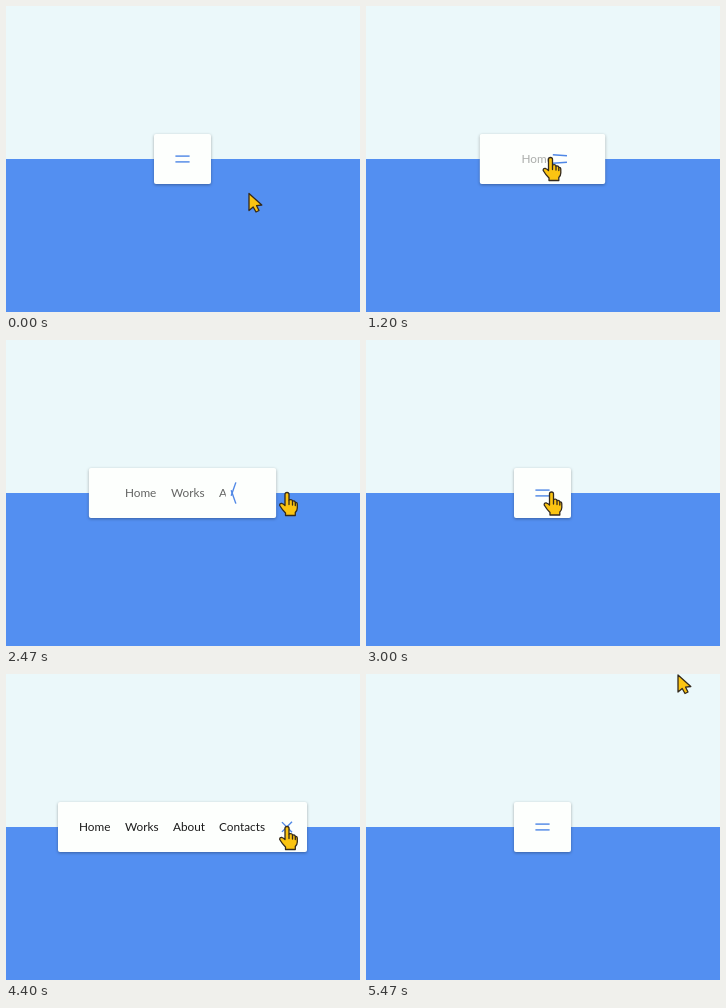
An HTML page that plays this animation: 354 by 306 pixels, repeating every 5.61 s.

```html
<!DOCTYPE html>
<html lang="en">
<head>
<meta charset="utf-8">
<title>Expanding menu</title>
<style>
  html, body { margin: 0; width: 100%; height: 100%; overflow: hidden; }
  svg { display: block; }
  #card { fill: #fdfffd; filter: drop-shadow(0 1.4px 1.7px rgba(0, 0, 0, .32)); }
  text { font: 11.8px Lato, "Open Sans", sans-serif; fill: #1c1c1c; }
  .line { fill: #4f87e6; }
  #cursor path { fill: #fbc412; stroke: #33291c; stroke-width: 1.3; stroke-linejoin: round; stroke-linecap: round; }
</style>
</head>
<body>
<svg width="354" height="306" viewBox="0 0 354 306">
  <clipPath id="clip"><rect id="window" y="128" height="50"/></clipPath>
  <rect width="354" height="153" fill="#ebf8fa"/>
  <rect y="153" width="354" height="153" fill="#538ff1"/>
  <rect id="card" y="128" height="50" rx="2"/>
  <g clip-path="url(#clip)">
    <g id="links">
      <text x="7" y="157">Home</text>
      <text x="53" y="157">Works</text>
      <text x="101" y="157">About</text>
      <text x="147" y="157">Contacts</text>
    </g>
  </g>
  <rect id="top" class="line" x="-7.1" y="-.7" width="14.2" height="1.4"/>
  <rect id="bottom" class="line" x="-7.1" y="-.7" width="14.2" height="1.4"/>
  <g id="cursor">
    <path id="arrow" d="M0 .5V17.5L4.2 14L7 19L10 17.5L7.6 12.7L12.8 12Z"/>
    <g id="hand">
      <path d="M-2 13V2Q-2 0 0 0Q2 0 2 2V7.5Q5 6.5 5.5 8.5Q8 8 8.3 10Q10.3 9.5 10.3 12V15.5Q10.3 18 8.3 20V23H-1.5V20.5Q-5 17-7.3 13Q-7.5 10.5-5 11Q-3.5 11.5-2 13Z"/>
      <path d="M2 8V12M5.5 9V12.5M8.3 10.5V13"/>
    </g>
  </g>
</svg>
<script>
const LOOP = 5610, CENTER = 176.5, PAD = 14, ICON = 21.3;
const toggles = [1023, 2310, 3405, 4715];          // open, close, open, close
const handTimes = [[330, 1430], [1900, 2580], [2960, 3850], [4090, 4880]];
const path = [                                     // time, x, y
  [70, 243, 187], [400, 184.5, 151.5], [1400, 184.5, 151.5], [1740, 266, 154],
  [1960, 281, 152.5], [2550, 281, 152.5], [2800, 265, 153], [3000, 185.5, 152],
  [3550, 185.5, 152], [3670, 176, 155], [3760, 176, 155], [4130, 281, 152.5],
  [4830, 281, 152.5], [5200, 308, 31], [5470, 312, .5]
];

const $ = id => document.getElementById(id);
const set = (id, attrs) => {
  for (const key in attrs) $(id).setAttribute(key, attrs[key]);
};
const clamp = v => Math.max(0, Math.min(1, v));

// How far the menu is open, for a linear transition after each toggle
const openness = (t, duration, delay = 0) => toggles.reduce(
  (sum, start, i) => sum + (i % 2 ? -1 : 1) * clamp((t - start - delay) / duration), 0);

function cursorAt(t) {
  const i = path.findIndex(k => k[0] > t);
  if (i === 0) return path[0].slice(1);
  if (i < 0) return path[path.length - 1].slice(1);
  const [t0, x0, y0] = path[i - 1], [t1, x1, y1] = path[i];
  const p = (t - t0) / (t1 - t0);
  return [x0 + (x1 - x0) * p, y0 + (y1 - y0) * p];
}

function draw(t) {
  const open = openness(t, 500), turn = openness(t, 600, 40);

  const width = 57 + 192 * open;
  set("card", { x: CENTER - width / 2, width });

  // The list and the icon share the centred row and shrink together when it is full
  const inner = width - 2 * PAD, list = inner * open;
  const shrink = Math.min(1, inner / (list + ICON));
  const left = CENTER - (list + ICON) * shrink / 2;
  const listWidth = list * shrink;
  set("window", { x: left, width: listWidth });
  set("links", { transform: `translate(${left} 0)`, opacity: open });

  const x = left + listWidth + ICON / 2, angle = 765 * turn, shift = 3.9 * turn;
  set("top", { transform: `translate(${x} 150.1) rotate(${-angle}) translate(0 ${shift})` });
  set("bottom", { transform: `translate(${x} 155.9) rotate(${angle}) translate(0 ${-shift})` });

  const hand = handTimes.some(([a, b]) => t >= a && t < b);
  set("cursor", { transform: `translate(${cursorAt(t)})` });
  set("hand", { visibility: hand ? "visible" : "hidden" });
  set("arrow", { visibility: hand ? "hidden" : "visible" });
}

const begin = performance.now();
function tick() {
  draw((performance.now() - begin) % LOOP);
  requestAnimationFrame(tick);
}
tick();
</script>
</body>
</html>
```
